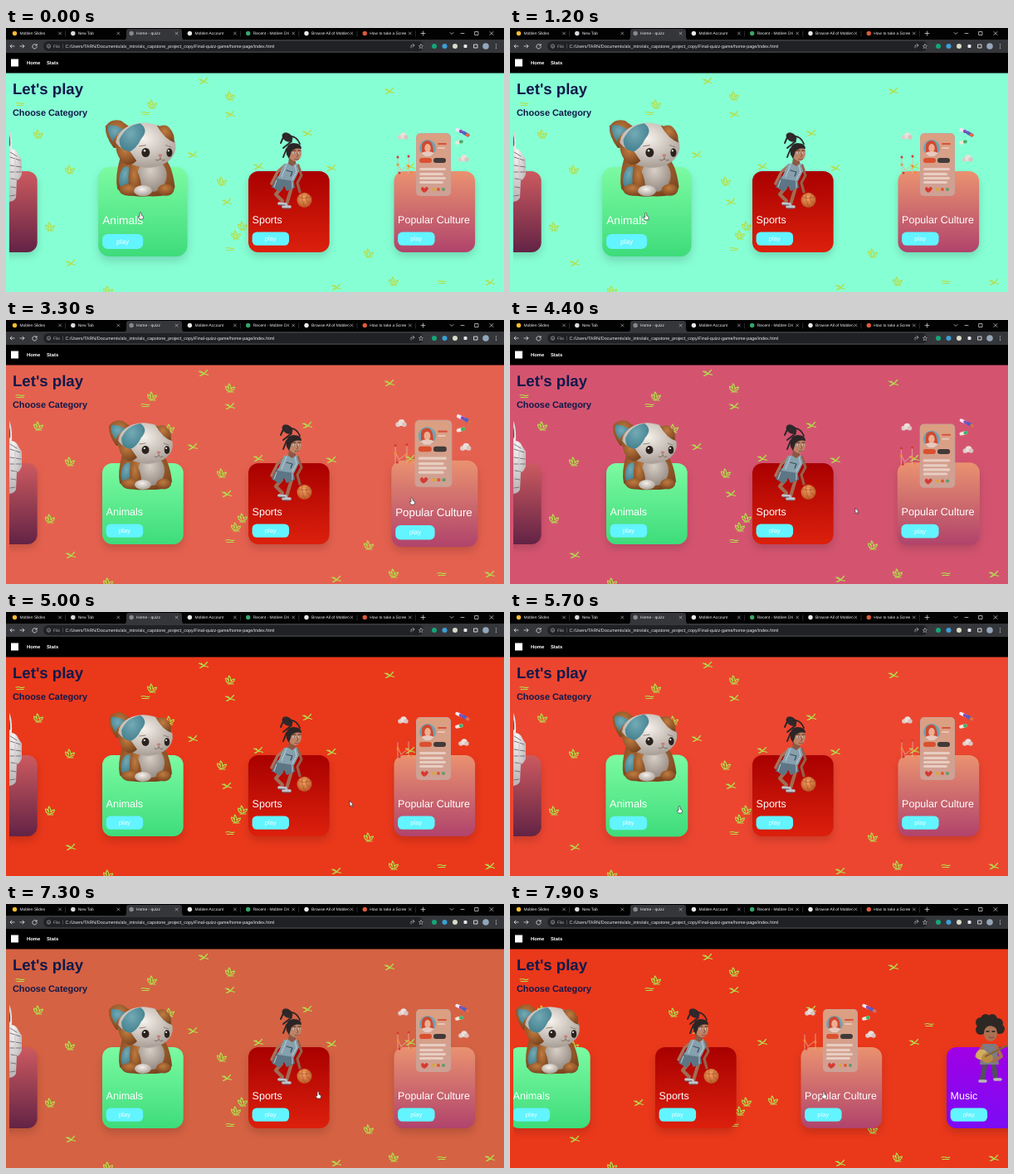
Animation of 600x319 px, one loop 8000 ms. Source, as an HTML page:

```html
<!DOCTYPE html>
<html lang="en">
<head>
<meta charset="utf-8">
<title>Quiz home</title>
<style>
html, body { margin: 0; height: 100%; overflow: hidden; background: #000; }
svg { display: block; width: 600px; height: 319px; font-family: "Liberation Sans", Arial, sans-serif; text-rendering: geometricPrecision; }
.card { filter: drop-shadow(0 5px 5px rgba(0, 0, 0, .15)); }
</style>
</head>
<body>
<svg id="stage" viewBox="0 0 600 319"></svg>
<script>
const circle = (x, y, r, fill) => `<circle cx="${x}" cy="${y}" r="${r}" fill="${fill}"/>`;
const oval = (x, y, rx, ry, fill, turn = 0) =>
  `<ellipse cx="${x}" cy="${y}" rx="${rx}" ry="${ry}" fill="${fill}" transform="rotate(${turn} ${x} ${y})"/>`;
const box = (x, y, w, h, fill, r = 0) => `<rect x="${x}" y="${y}" width="${w}" height="${h}" rx="${r}" fill="${fill}"/>`;
const shape = (d, fill) => `<path d="${d}" fill="${fill}"/>`;
const line = (d, color, w = 1) =>
  `<path d="${d}" fill="none" stroke="${color}" stroke-width="${w}" stroke-linecap="round" stroke-linejoin="round"/>`;
const text = (x, y, size, fill, str, more = '') => `<text x="${x}" y="${y}" font-size="${size}" fill="${fill}" ${more}>${str}</text>`;

let defs = '';
function gradient(id, from, to, radial) {
  const tag = radial ? 'radialGradient' : 'linearGradient';
  const dir = radial ? 'cx=".45" cy=".35" r=".65"' : 'x1="0" y1="0" x2="0" y2="1"';
  defs += `<${tag} id="${id}" ${dir}><stop stop-color="${from}"/><stop offset="1" stop-color="${to}"/></${tag}>`;
  return `url(#${id})`;
}
const fur = gradient('fur', '#f7f2ec', '#a99f97', true);
const belly = gradient('belly', '#d8cfc6', '#968b83', true);
const amber = gradient('amber', '#c07c40', '#7c451f', true);
const teal = gradient('teal', '#73aab5', '#437f8e', true);
const ballFill = gradient('ball', '#f6a263', '#b95724', true);
const suit = gradient('suit', '#f7f4f2', '#b9b3b5', true);
const phone = gradient('phone', '#dc9f80', '#cfa095');

// Figures stand at the unscrolled place of their card.
const astronaut = () =>
  shape('M0 117Q8 122 7 146Q13 147 15 153L19 159V177Q16 184 13 184L12 205Q9 211 0 210Z', suit) +
  shape('M0 122Q6 128 5 142L0 147Z', '#55505b') +
  line('M5 150L13 155M5 156L17 160M5 166L18 168M5 174L18 174M6 182L13 183M6 192L12 193M5 203L11 202', '#6f6973', .9) +
  line('M11 158V182', '#d2cbcc', 1.5);

const cat = () =>
  shape('M140 163Q134 184 137 197Q146 207 172 205Q197 206 200 195Q197 170 188 163Z', amber) +
  oval(175, 182, 16, 18, belly) + oval(145, 184, 6, 12, teal, 12) +
  shape('M151 170Q164 178 163 199L151 202Q147 184 151 170Z', amber) +
  oval(150, 198, 11, 6.5, amber) + oval(190, 198, 9, 6.5, amber) + oval(165, 199, 10, 6, fur) +
  shape('M133 152Q123 139 124 128Q130 119 141 122L152 130L143 151Z', amber) +
  shape('M132 145Q125 134 127 127Q136 126 144 132Q136 136 132 145Z', teal) +
  shape('M180 130Q189 124 194 130Q200 136 199 145Z', amber) +
  oval(168, 149, 33, 24.5, fur, 7) +
  shape('M139 143Q146 127 162 125Q172 132 163 142Q157 155 147 157Q139 153 139 143Z', teal) +
  shape('M135 146Q142 155 151 156L158 166Q151 173 145 169Q135 162 135 146Z', amber) +
  shape('M180 127Q196 131 200 146Q189 143 180 127Z', amber) +
  oval(168, 157, 4.5, 5, '#2b211d') + oval(194, 157, 3.2, 4.8, '#2b211d') +
  circle(166.8, 155, 1.1, '#fff') + circle(193, 155, 1, '#fff') +
  line('M161 150L168 149M190 149L196 151', '#8b7a70', .9) +
  oval(184, 160, 2.3, 1.5, '#c97d78') + line('M184 162V164Q181 167 179 165M184 164Q187 167 189 165', '#7a5c53', .8);

const player = () =>
  line('M336 166L327 174L320 188', '#a9725a', 3.6) + line('M352 166L356 178L351 187L354 198', '#965f49', 3.2) +
  line('M332 193L325 201L333 209M344 193L341 203L338 213', '#a06c55', 4.2) +
  line('M329 212L337 213M334 216L342 216', '#bfc5cb', 3.6) + line('M329 214H336M334 218H341', '#4e5967', 1) +
  shape('M327 179L346 180L348 193L338 197L335 191L330 198L320 192Z', '#5d7584') +
  shape('M335 164L350 163L353 173L347 185L327 182Z', '#86a1ad') +
  line('M338 165L332 180M348 165L350 174L345 183M326 184L323 192M345 185L345 193', '#bdcfd8', 1) +
  line('M338 172L345 174L343 179', '#3b4f5c', 1.3) +
  shape('M341 157H349V164L345 167L340 164Z', '#8b5944') + oval(348, 151, 8, 10, '#bd8468', -5) +
  shape('M338 153Q336 140 346 139Q356 139 356 146Q348 144 344 149L341 158Z', '#2b2526') +
  oval(339, 132, 7, 5, '#30282a', 35) +
  line('M335 130L331 139M341 131Q350 130 354 140M344 137L334 145M338 146L334 156', '#2b2526', 1.9) +
  line('M345 148H349M352 148H355', '#442a26', 1.1) +
  oval(347, 151, 1.6, 1.1, '#fff') + oval(353.5, 151, 1.3, 1, '#fff') + circle(347.3, 151, .8, '#211b20') + circle(353.8, 151, .7, '#211b20') +
  line('M351 152L352 155L350 156M348 158.5Q351 159.5 353 158', '#7d4338', .8) +
  circle(359.5, 208, 9, ballFill) + line('M351 204Q360 207 368 204M357 199Q355 209 361 217M364 201Q358 209 367 212', '#9c4b25', .6);

const cloud = (x, y) => circle(x - 3, y + 1, 2.8, '#dfcbc7') + circle(x + 1, y - 1, 3.7, '#ecdeda') + circle(x + 4, y + 1, 2.7, '#d8c4c1');
function pill(x, y, a, b, turn) {
  return `<g transform="rotate(${turn} ${x} ${y})">${box(x - 5, y - 2, 10, 4, a, 2)}${box(x, y - 2, 5, 4, b, 2)}</g>`;
}
const app = () =>
  box(494, 127, 42, 76, '#c9a297', 5) + box(495, 128, 39, 74, phone, 4) +
  circle(508, 145, 10, '#72a3b2') + shape('M501 151V142Q502 136 508 136Q515 137 515 151Z', '#cf4930') +
  oval(508, 145, 3.7, 5, '#edae91') + shape('M500 151Q508 147 516 151L511 155H505Z', '#e8c9be') +
  box(520, 139, 11, 2, '#d7543c', 1) + box(520, 144, 9, 2, '#e8c4b6', 1) + box(498, 157, 15, 6, '#d9512f', 3) + box(515, 157, 15, 6, '#423a39', 3) +
  [169, 175, 180, 185].map((y, i) => box(498, y, i % 2 ? 29 : 32, 3, '#e8cdc2', 1.5)).join('') +
  shape('M500 194Q502 190 504 194Q507 190 509 194Q508 197 504 199Q500 197 500 194Z', '#d63b31') +
  circle(515, 195, 2, '#d9a53b') + circle(521, 195, 2, '#dd5a32') + circle(527, 195, 2, '#5f9b69') +
  cloud(478, 131) + cloud(551, 158) + pill(546, 124, '#efe6f3', '#8c4bb5', 25) + pill(554, 128, '#4f5fc6', '#e86a43', 30) + pill(546, 138, '#f0e5d9', '#42b069', -15) +
  line('M472 175V157M476 172L485 165M485 175V155M476 172L472 164', '#e9b09c', .8) +
  [[472, 156], [472, 165], [485, 155], [485, 167], [474, 175], [488, 174]].map(([x, y], i) => circle(x, y, 1.5, i % 2 ? '#f08a35' : '#d43b36')).join('');

const rocker = () =>
  line('M690 190L686 212M699 190L702 210', '#51505b', 6) + line('M683 214H690M701 212H708', '#b9b6b7', 3.5) +
  shape('M686 169L703 169L706 194H683Z', '#7e7b83') + line('M686 173L679 184L691 189M703 172L709 184L700 190', '#a86d4d', 4) +
  [[684, 143], [690, 139], [698, 139], [705, 144], [707, 151], [684, 152], [692, 147]].map(([x, y]) => circle(x, y, 6, '#2d2824')).join('') +
  oval(696, 156, 8, 10, '#aa7253') + shape('M688 152Q694 143 704 151Q702 144 696 142Q688 143 688 152Z', '#2d2824') +
  line('M691 154H694M698 154H701', '#241d1b', 1.4) + line('M694 161Q697 163 700 161', '#6d3930', .8) +
  oval(685, 182, 7, 6, '#d3ad62', -20) + oval(692, 186, 7, 6, '#b98b43') + line('M690 184L722 168', '#826536', 2.2);

const cards = [
  { x: -60, title: '', colors: ['#cc5a60', '#632345'], art: astronaut },
  { x: 116, title: 'Animals', colors: ['#7cfaa2', '#3edc7b'], art: cat },
  { x: 292, title: 'Sports', colors: ['#a80000', '#dc200c'], art: player },
  { x: 467.5, title: 'Popular Culture', colors: ['#ea9270', '#b0436c'], art: app },
  { x: 643, title: 'Music', colors: ['#a000e4', '#7b0cf5'], art: rocker },
];
function card({ x, title, colors, art }, i) {
  const fill = gradient('card' + i, ...colors);
  return `<g id="c${i}"><g class="card">${box(x, 173, 97.7, 98, fill, 12)}</g>${art()}` +
    text(x + 4.6, 236, 12.5, '#fff', title) + box(x + 4.6, 246.5, 44.5, 16.3, '#62f4ff', 5.5) +
    text(x + 26.8, 257, 7.6, '#f2fdff', 'play', 'text-anchor="middle"') + '</g>';
}

// Scribbles on the page: twigs, tufts and dashes.
const marks = {
  twig: ['M-5.5 -2Q0 1 5.5 2.5M-4.5 3.5Q0 2 4.5 -3.5M-3 -2L1 1.5', [238, 64, 462, 76, 270, 104, 225, 153, 363, 127, 304, 167, 392, 169, 487, 167, 155, 240, 78, 284, 398, 313, 266, 210, 583, 307]],
  tuft: ['M-5.5 -2Q-5.5 3 -1 4Q5 3.5 5.5 -1Q2 -1 1 2Q1 -3 -1.5 -5Q-3 -2 -1.5 2Q-3 -2 -5.5 -2M-3 5H4', [176, 92, 270, 82, 39, 128, 197, 131, 77, 171, 260, 185, 53, 240, 285, 239, 277, 250, 317, 237, 437, 272, 467, 306, 123, 317]],
  dash: ['M-5 -1Q-2 -2 0 -1T5 -1M-4 1.5H4', [17, 92, 168, 103, 505, 146, 270, 267, 549, 204, 525, 307]],
};
const scribbles = Object.values(marks).map(([d, at]) => at.map((x, i) => i % 2 ? '' :
  `<g transform="translate(${x} ${at[i + 1]})">${line(d, '#b2de4c', 1.2)}</g>`).join('')).join('');

const tabs = [
  ['Moblen Slides', '#f5bd2c'], ['New Tab', '#d9dbdf'], ['Home - quizz', '#85888d'], ['Moblen Account', '#e9e9ed'],
  ['Recent - Moblen Dri', '#35a66a'], ['Browse All of Moblen', '#e9e9ed'], ['How to take a Scree', '#df5a38'],
];
const chrome = box(0, 0, 600, 14.5, '#020202') + box(0, 14, 600, 16, '#35363a') +
  shape('M142 14.5Q145 14 145 10V4Q145 1 148 1H209Q212 1 212 4V10Q212 14 215 14.5Z', '#35363a') +
  tabs.map(([name, color], i) => {
    const x = 10.5 + 70.3 * i;
    return circle(x, 6.5, 2.7, color) + text(x + 6, 8.4, 4.9, '#e8eaed', name) +
      line(`M${x + 53} 5l3 3m0 -3l-3 3`, '#c9cbd0', .6) + (i == 1 || i == 2 ? '' : line(`M${x + 61} 4V10`, '#55575c', .5));
  }).join('') +
  line('M500 6.5h5m-2.5 -2.5v5M535 5.5l2 2l2 -2M548 6.5h4M565 4.5h4v4h-4zM583 4.5l4 4m0 -4l-4 4', '#e2e3e6', .7) +
  line('M10 22H5l2 -2m-2 2l2 2M17 22h5l-2 -2m2 2l-2 2M36.5 20.5a2.7 2.7 0 1 0 .7 2m0 -3v1.5h-1.6', '#e2e3e6', .8) +
  box(45, 16, 458, 12, '#202124', 6) + `<circle cx="51.5" cy="22" r="2.2" fill="none" stroke="#c4c6ca" stroke-width=".6"/>` +
  line('M51.5 21.8v1.2', '#c4c6ca', .6) + text(57, 23.9, 5, '#a6a9ad', 'File') + line('M68.5 19.5v5', '#696c70', .5) +
  text(71.5, 23.9, 5.4, '#e8eaed', 'C:/Users/TARN/Documents/alx_intro/alx_capstone_project_copy/Final-quizz-game/home-page/index.html') +
  line('M488 24v-3h4m-2 -2l2 2l-2 2M500 19.5l.8 1.7l1.8 .2l-1.3 1.3l.3 1.9l-1.6 -1l-1.6 1l.3 -1.9l-1.3 -1.3l1.8 -.2z', '#c9cbd0', .6) +
  circle(516, 22, 3, '#15a67a') + circle(528.5, 22, 3, '#3c9fd7') + circle(541, 22, 3, '#d8dbc8') +
  box(551.5, 20, 4, 4, '#e4e6e9', 1) + line('M564 20h4v4h-4z', '#e4e6e9', .9) + circle(578, 22, 3.8, '#93a6ba') +
  [19.8, 22, 24.2].map(y => circle(590.5, y, .6, '#dfe1e5')).join('') +
  box(0, 30, 600, 24.5, '#000') + box(6, 37.5, 9, 9, '#fff') +
  text(25, 44.2, 5.8, '#fff', 'Home', 'font-weight="bold"') + text(49, 44.2, 5.8, '#fff', 'Stats', 'font-weight="bold"');

const row = cards.map(card).join('');
const stage = document.getElementById('stage');
stage.innerHTML = `<defs>${defs}<clipPath id="view"><path d="M4 54H600V319H4Z"/></clipPath></defs>` +
  `<rect id="page" y="54" width="600" height="265"/>${scribbles}` +
  text(8, 79.5, 18.6, '#10194a', "Let's play", 'font-weight="bold"') +
  text(8, 106.3, 10.9, '#10194a', 'Choose Category', 'font-weight="bold"') +
  `<g clip-path="url(#view)"><g id="row">${row}</g></g>${chrome}<g id="cursor" stroke="#222" stroke-width=".6" fill="#fff">` +
  `<path id="hand" d="M-1 -4Q0 -5 1 -4V-1L3 0Q4 1 3 4H-1L-3 1Q-3 0 -1 1Z"/><path id="arrow" d="M-1 -4V3L.5 1.7L1.6 4L2.6 3.5L1.5 1.2H3.4Z"/></g>`;

const aqua = [135, 255, 213], salmon = [228, 153, 130], pink = [214, 90, 122], red = [234, 56, 27];
const pageKeys = [
  [0, ...aqua], [1850, ...aqua], [2100, 226, 160, 140], [2250, ...salmon], [2750, ...salmon], [3050, ...red],
  [3300, 229, 97, 79], [3700, ...pink], [4150, ...pink], [4400, 212, 84, 112], [5000, ...red], [5600, ...red],
  [5700, 236, 70, 48], [6100, ...aqua], [6950, ...aqua], [7450, ...red],
];
const cursorKeys = [
  [0, 162, 227], [1600, 164, 228], [2100, 326, 231], [2650, 330, 231], [3300, 489, 219], [3950, 491, 221],
  [4400, 417, 231], [5100, 415, 232], [5700, 204, 239], [6600, 193, 239], [6850, 195, 239], [7300, 376, 231], [7900, 378, 231],
];
const scaleKeys = {
  1: [[0, 1.1], [1800, 1.1], [2050, 1], [5650, 1], [5700, 1.012], [5950, 1.1], [6900, 1.1], [7150, 1]],
  2: [[1950, 1], [2100, 1.045], [2250, 1.1], [2750, 1.1], [3000, 1]],
  3: [[3150, 1], [3300, 1.065], [3400, 1.1], [4180, 1.1], [4400, 1.015], [4450, 1]],
};
const scrollKeys = [[7300, 0], [7850, 117]];

function at(keys, t) {
  const n = keys.findIndex(k => k[0] > t);
  if (n < 1) return (n ? keys[keys.length - 1] : keys[0]).slice(1);
  const [a, b] = [keys[n - 1], keys[n]];
  const u = (t - a[0]) / (b[0] - a[0]), e = u * u * (3 - 2 * u);
  return a.slice(1).map((v, i) => v + (b[i + 1] - v) * e);
}

const el = id => document.getElementById(id);
function draw(now) {
  const t = now % 8000, [x, y] = at(cursorKeys, t), [scroll] = at(scrollKeys, t);
  el('page').setAttribute('fill', `rgb(${at(pageKeys, t).map(Math.round)})`);
  el('row').setAttribute('transform', `translate(${-scroll} 0)`);
  for (const i in scaleKeys) {
    const [s] = at(scaleKeys[i], t), cx = cards[i].x + 48.85;
    el('c' + i).setAttribute('transform', `translate(${cx} 222) scale(${s}) translate(${-cx} -222)`);
  }
  const over = cards.some(c => x + scroll > c.x && x + scroll < c.x + 98);
  el('cursor').setAttribute('transform', `translate(${x} ${y})`);
  el('hand').setAttribute('visibility', over ? 'visible' : 'hidden');
  el('arrow').setAttribute('visibility', over ? 'hidden' : 'visible');
  requestAnimationFrame(draw);
}
draw(performance.now());
</script>
</body>
</html>
```
